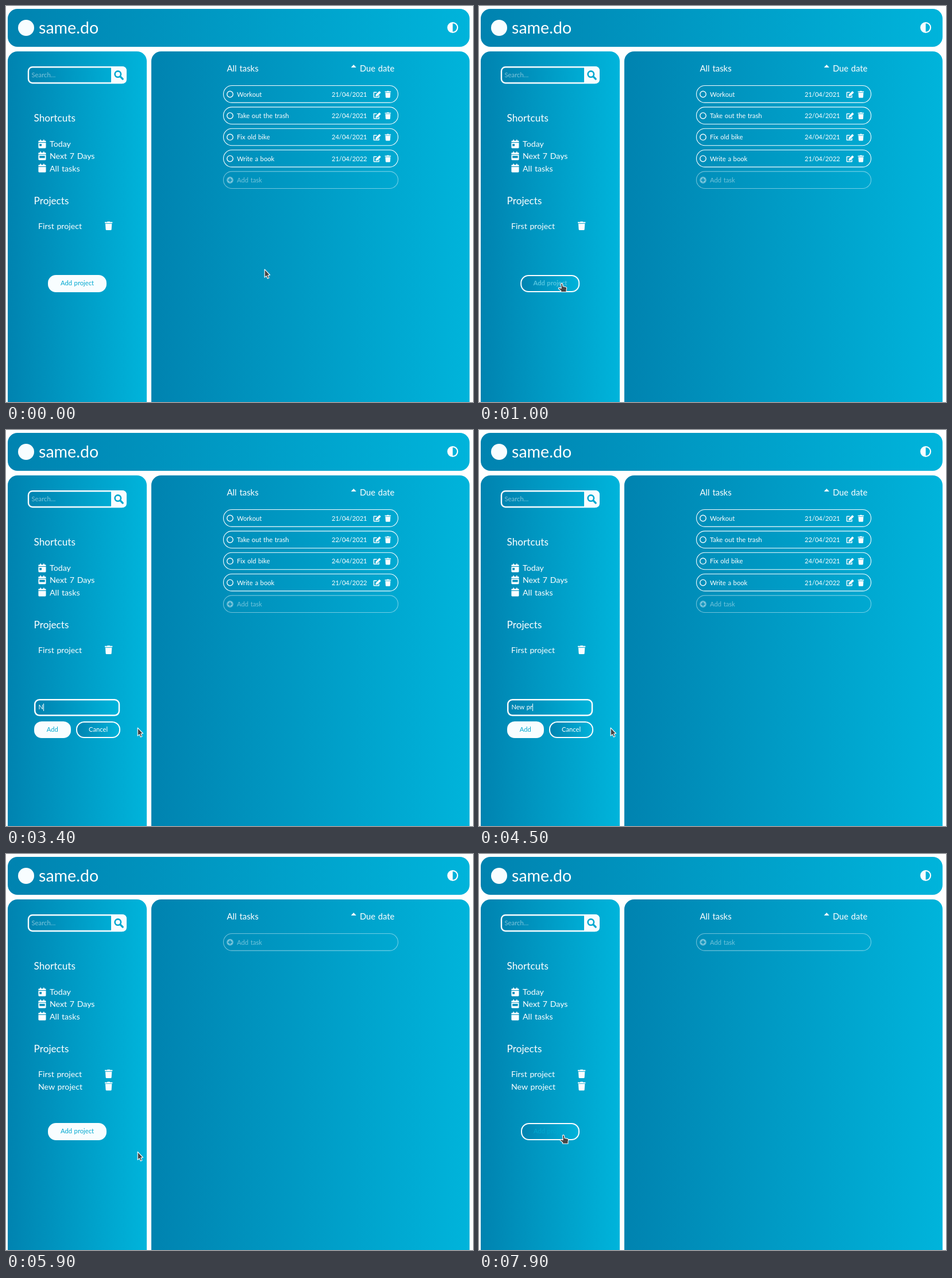
These frames come from a looping animation (813x689 px, 8 s). An HTML page:

```html
<!DOCTYPE html>
<html lang="en">
<head>
<meta charset="utf-8">
<title>Task list</title>
<style>
  html, body { margin: 0; width: 100%; height: 100%; overflow: hidden; background: #fff; }
  svg { display: block; }
  text { font-family: Lato, "Open Sans", sans-serif; word-spacing: .07em; fill: #fff; white-space: pre; }
  .mid { text-anchor: middle; }
  .blue { fill: #00a8d0; }
</style>
</head>
<body>
<svg id="stage" width="813" height="689" viewBox="0 0 813 689">
  <defs>
    <linearGradient id="sea"><stop stop-color="#0083b0"/><stop offset="1" stop-color="#00b4db"/></linearGradient>
  </defs>
</svg>
<script>
const LOOP = 8000, PAPER = '#f8fdff', SEA = 'url(#sea)';
const stage = document.getElementById('stage');

function add(parent, tag, attrs, content) {
  const el = document.createElementNS('http://www.w3.org/2000/svg', tag);
  for (const key in attrs) el.setAttribute(key, attrs[key]);
  if (content !== undefined) el.textContent = content;
  return parent.appendChild(el);
}
const group = (parent, attrs = {}) => add(parent, 'g', attrs);
const text = (parent, x, y, size, content, cls = '') =>
  add(parent, 'text', { x, y, 'font-size': size, class: cls }, content);
const box = (parent, x, y, width, height, rx, fill, line = 0) =>
  add(parent, 'rect', { x, y, width, height, rx, fill, stroke: line ? PAPER : 'none', 'stroke-width': line });
const disc = (parent, cx, cy, r, attrs = { fill: PAPER }) => add(parent, 'circle', { cx, cy, r, ...attrs });
const path = (parent, d, attrs = { fill: PAPER }) => add(parent, 'path', { d, ...attrs });
const show = (el, on) => el.setAttribute('visibility', on ? 'inherit' : 'hidden');

// icons
function trash(parent, x, y, scale) {
  path(parent, 'M0 1h4l1-1h4l1 1h4v2H0zM1 4h12l-.7 10.6a1.5 1.5 0 0 1-1.5 1.4H3.2a1.5 1.5 0 0 1-1.5-1.4z',
    { fill: PAPER, transform: `translate(${x} ${y}) scale(${scale})` });
}
function calendar(y, hole) {
  path(stage, 'M0 6h14v8.5a1.5 1.5 0 0 1-1.5 1.5h-11A1.5 1.5 0 0 1 0 14.5z' +
    'M0 5V3.5A1.5 1.5 0 0 1 1.5 2H3V.4Q3 0 3.4 0h1.2Q5 0 5 .4V2h4V.4Q9 0 9.4 0h1.2q.4 0 .4.4V2h1.5A1.5 1.5 0 0 1 14 3.5V5z' + hole,
    { fill: PAPER, 'fill-rule': 'evenodd', transform: `translate(56.4 ${y}) scale(.94)` });
}
function pencil(parent, x, y) {
  const g = group(parent, { transform: `translate(${x} ${y}) scale(.75)` });
  path(g, 'M13 10v4.6H1.2V3.4H8', { fill: 'none', stroke: PAPER, 'stroke-width': 2, 'stroke-linejoin': 'round' });
  path(g, 'M5.5 8.8 13.3 1q.8-.8 1.6 0l2 2q.8.8 0 1.6L9.1 12.4l-3.9.4z');
}

// header and panels
box(stage, 3, 5, 804, 66, 17, SEA);
box(stage, 3, 79, 242, 640, 17, SEA);
box(stage, 253, 79, 554, 640, 17, SEA);
disc(stage, 35, 38, 14);
text(stage, 57, 48, 28.6, 'same.do');
disc(stage, 777.7, 37.5, 8.4, { fill: 'none', stroke: PAPER, 'stroke-width': 2.2 });
path(stage, 'M777.7 29a8.5 8.5 0 0 0 0 17z');

// sidebar
box(stage, 39, 106.2, 169.6, 27.8, 7, SEA, 2.4);
path(stage, 'M183 105h19q8 0 8 8v14q0 8-8 8h-19z');
text(stage, 44.5, 124, 11.3, 'Search…').setAttribute('opacity', .5);
disc(stage, 194.8, 118.6, 5.2, { fill: 'none', stroke: '#00a8d0', 'stroke-width': 2.6 });
path(stage, 'M198.8 122.6l4.4 4.4', { stroke: '#00a8d0', 'stroke-width': 3.2, 'stroke-linecap': 'round' });
text(stage, 48.6, 201, 17.2, 'Shortcuts');
calendar(232.4, 'M2 8h4v4H2z');
calendar(253.2, 'M2 8h10v4H2z');
calendar(274.4, '');
['Today', 'Next 7 Days', 'All tasks'].forEach((label, i) => text(stage, 76, 245.3 + 21.1 * i, 14.2, label));
text(stage, 48.6, 345, 17.2, 'Projects');
function project(parent, y, name) {
  text(parent, 56, y, 14.2, name);
  trash(parent, 172, y - 13.4, .95);
}
project(stage, 388.3, 'First project');
const newProject = group(stage);
project(newProject, 409.7, 'New project');

// add button
const button = group(stage);
const buttonBox = box(button, 74, 469, 100, 28, 13, PAPER, 2);
const buttonText = text(button, 124, 486.3, 11.2, 'Add project', 'mid');

// project form
const form = group(stage);
box(form, 50.2, 469.2, 146.8, 27.4, 8, SEA, 2.5);
const hint = text(form, 56.4, 486.3, 11.2, 'Project name');
hint.setAttribute('opacity', .5);
const typed = text(form, 56.4, 486.3, 11.2, '');
const caret = add(form, 'rect', { y: 476, width: 1, height: 13, fill: '#fff' });
box(form, 49, 507, 64, 29, 13, PAPER);
text(form, 80.8, 525, 11.2, 'Add', 'mid blue');
box(form, 123, 508, 75, 27, 13, SEA, 2);
text(form, 160.5, 525, 11.2, 'Cancel', 'mid');

// task list
text(stage, 384.5, 114, 14.9, 'All tasks');
path(stage, 'M600.6 107l4.6-5 4.6 5z');
text(stage, 616, 114, 14.7, 'Due date');
const rowBox = (parent, y) => box(parent, 378.5, y - 15, 304, 29.6, 14.8, 'none', 1.1);
const tasks = group(stage);
[['Workout', '21/04/2021'], ['Take out the trash', '22/04/2021'],
 ['Fix old bike', '24/04/2021'], ['Write a book', '21/04/2022']].forEach(([name, due], i) => {
  const y = 153.5 + 37.35 * i;
  rowBox(tasks, y);
  disc(tasks, 390, y, 5.2, { fill: 'none', stroke: PAPER, 'stroke-width': 1.4 });
  text(tasks, 402, y + 4.2, 11.2, name);
  text(tasks, 567, y + 4.2, 11.1, due);
  pencil(tasks, 639.5, y - 5.8);
  trash(tasks, 659.6, y - 5.8, .75);
});
const addTask = group(stage, { opacity: .45 });
rowBox(addTask, 153.5);
path(addTask, 'M384.2 153.5a5.8 5.8 0 0 1 11.6 0a5.8 5.8 0 0 1-11.6 0zM389.1 150.2v2.4h-2.4v1.8h2.4v2.4h1.8v-2.4h2.4v-1.8h-2.4v-2.4z',
  { fill: PAPER, 'fill-rule': 'evenodd' });
text(addTask, 402, 157.7, 11.2, 'Add task');

// pointers, with the hot spot at 0,0
const ink = { fill: '#454545', stroke: '#fff', 'stroke-width': 1.1, 'stroke-linejoin': 'round' };
const pointers = {
  arrow: group(stage), hand: group(stage), beam: group(stage)
};
path(pointers.arrow, 'M.2.2V14.2L3.3 11.6 5.4 16.2 7.9 15.1 5.9 10.6 9.6 10z', ink);
path(pointers.hand, 'M-1.6.8Q-.2-1 1.2.7L2 5.2 7.4 6.4Q8.8 6.8 8.6 8.4L8 12V15H-1.4V13L-5.5 9.6Q-6.2 8-4.4 7.6L-.9 8.6z', ink);
const beamPath = 'M-2.5-6.5H-1Q0-6.5 0-5.5Q0-6.5 1-6.5H2.5M0-5.5V5.5M-2.5 6.5H-1Q0 6.5 0 5.5Q0 6.5 1 6.5H2.5';
path(pointers.beam, beamPath, { fill: 'none', stroke: '#d8eef5', 'stroke-width': 2.6 });
path(pointers.beam, beamPath, { fill: 'none', stroke: '#454545', 'stroke-width': 1 });

// pointer moves: start, end, target x, target y, easing
const swing = p => p < .5 ? 8 * p ** 4 : 1 - 8 * (1 - p) ** 4;
const even = p => p;
const moves = [
  [300, 1200, 138, 483, swing],
  [1200, 1300, 140, 482, even],
  [1800, 2000, 103, 472, even],
  [2100, 2200, 102, 473, even],
  [2500, 2800, 229, 518, even],
  [6900, 7100, 240, 509, even],
  [7500, 7900, 147, 489, p => p ** 1.5]
];
function pointerAt(t) {
  let x = 450, y = 458;
  for (const [start, end, toX, toY, ease] of moves) {
    if (t <= start) break;
    const k = ease(Math.min(1, (t - start) / (end - start)));
    x += (toX - x) * k;
    y += (toY - y) * k;
  }
  return [x, y];
}

const WORD = 'New project';
const keyTimes = [3400, 3600, 3800, 4000, 4300, 4500, 4700, 4900, 5000, 5200, 5400];

function draw(now) {
  const t = Math.floor(now % LOOP / 100) * 100; // the screen updates ten times a second
  const editing = t >= 1800 && t < 5900, done = t >= 5900;

  show(form, editing);
  show(button, !editing);
  show(newProject, done);
  show(tasks, !done);
  addTask.setAttribute('transform', `translate(0 ${done ? 0 : 149.4})`);

  const hover = t >= 7900 || t >= 900 && t < 1800;
  const glow = hover && !done ? Math.min(1, (t - 900) / 300) : 0;
  buttonBox.setAttribute('fill', hover ? SEA : PAPER);
  buttonBox.setAttribute('x', glow ? 73.2 : 74);
  buttonBox.setAttribute('width', glow ? 101 : 100);
  buttonText.style.fill = `rgb(${255 * glow},${168 + 87 * glow},${208 + 47 * glow})`;
  buttonText.style.fontWeight = glow ? 700 : 400;

  const count = keyTimes.filter(k => k <= t).length;
  typed.textContent = WORD.slice(0, count);
  show(hint, !count);
  show(caret, editing && t >= 2400);
  caret.setAttribute('x', 56 + Math.round(count ? typed.getComputedTextLength() : 0));

  const kind = hover ? 'hand' : t >= 1800 && t < 2700 ? 'beam' : 'arrow';
  const [x, y] = pointerAt(t);
  for (const name in pointers) show(pointers[name], name === kind);
  pointers[kind].setAttribute('transform', `translate(${x} ${y})`);
}

const begin = performance.now();
function tick() {
  draw(performance.now() - begin);
  requestAnimationFrame(tick);
}
tick();
</script>
</body>
</html>
```
